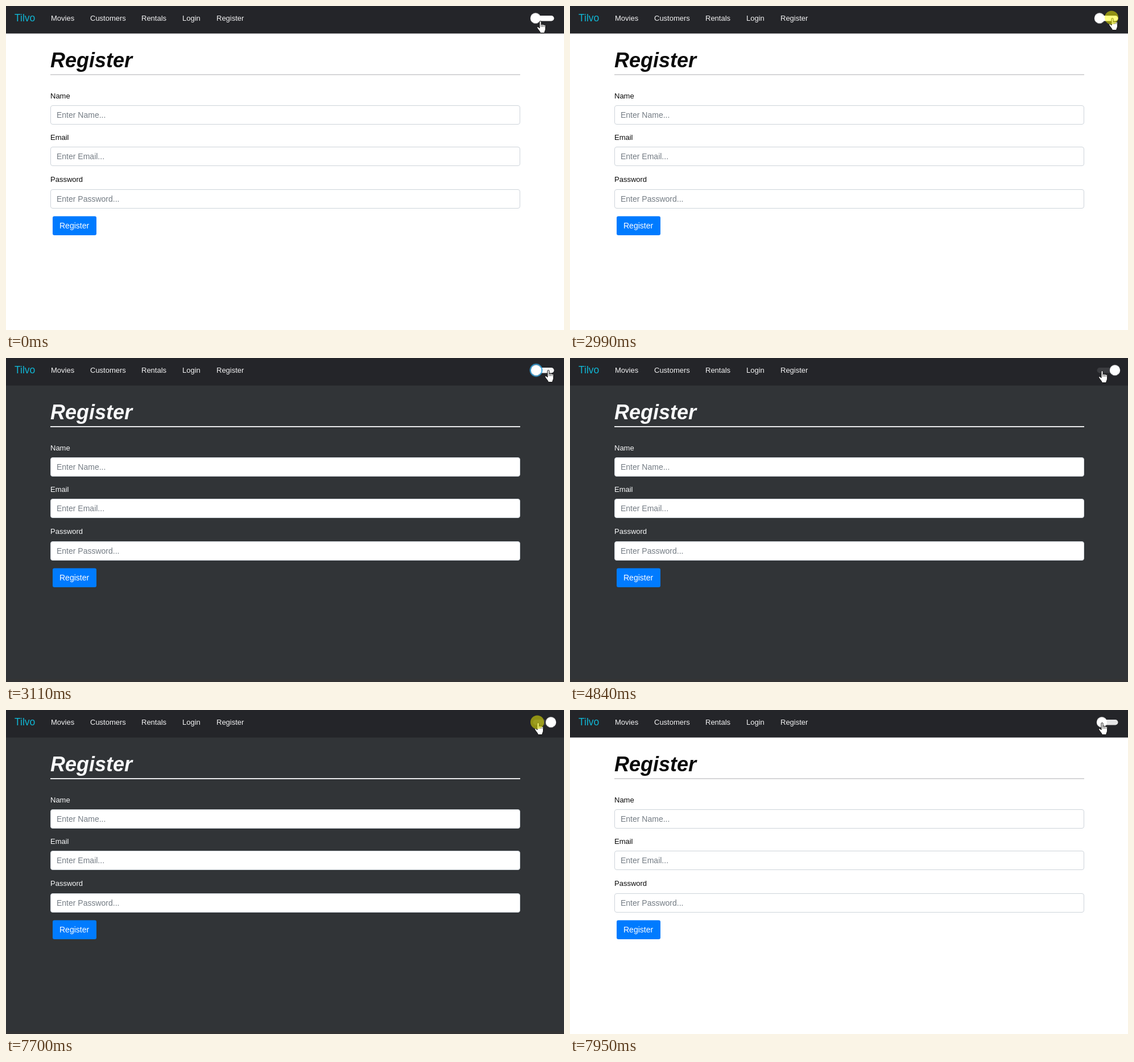
Animation, 981 px wide and 571 px high, one loop 8000 ms. Source, as an HTML page:

```html
<!DOCTYPE html>
<html lang="en">
<head>
<meta charset="utf-8">
<title>Register form with theme switch</title>
<style>
  html, body { margin: 0; width: 100%; height: 100%; overflow: hidden; background: #fff; }
  svg { display: block; width: 981px; height: 571px; }
  text { font: 13px "Liberation Sans", Arial, sans-serif; }
  .nav text { fill: #f3f3f4; }
  .nav .brand { font-size: 17.5px; fill: #10b6d4; }
  .title { font-size: 36px; font-weight: bold; font-style: italic; }
  .fields rect { fill: #fff; stroke: #ced4da; }
  .fields text { font-size: 14px; fill: #747c84; }
  .button text { font-size: 14px; fill: #fff; }

  .dark, .ink, .track, .thumb, .ring, .cursor, .click {
    animation: 8s step-end infinite;
  }
  .dark { animation-name: dark; }
  .ink { fill: currentColor; animation-name: ink; }
  .track { animation-name: track; }
  .thumb { animation-name: thumb; }
  .ring { animation-name: ring; }
  .cursor { animation-name: cursor; }
  .click { animation-name: click; }

  @keyframes dark {
    0%, 97.875% { opacity: 0; }
    38.875% { opacity: 1; }
  }
  @keyframes ink {
    0%, 97.875% { color: #0a0a0a; }
    38.875% { color: #f8f9fa; }
  }
  @keyframes track {
    0% { fill: #fff; }
    38.875% { fill: #f6f6f6; }
    40.5% { fill: #57585c; }
    42% { fill: #3b3c40; }
    97.875% { fill: #45454c; }
    99.375% { fill: #e6e6e7; }
  }
  @keyframes thumb {
    0% { transform: translate(931px, 21.5px); }
    38.875% { transform: translate(932px, 21.5px); }
    40.5% { transform: translate(954px, 21.5px); }
    42% { transform: translate(958px, 21.5px); }
    97.875% { transform: translate(957px, 21.5px); }
    99.375% { transform: translate(935px, 21.5px); }
  }
  @keyframes ring {
    0%, 42% { opacity: 0; }
    38.875% { opacity: .85; }
    40.5% { opacity: .1; }
  }
  @keyframes cursor {
    0% { transform: translate(933px, 26px); }
    1.5% { transform: translate(931px, 27px); }
    3% { transform: translate(928px, 25px); }
    4.625% { transform: translate(927px, 24px); }
    7.75% { transform: translate(938px, 22px); }
    9.375% { transform: translate(947px, 21px); }
    54.375% { transform: translate(940px, 22px); }
    56% { transform: translate(933px, 22px); }
    58.875% { transform: translate(930px, 22px); }
    60.5% { transform: translate(929px, 22px); }
  }
  @keyframes click {
    0%, 38.875%, 97.875% { opacity: 0; }
    37.375%, 96.25% { opacity: .5; }
  }
</style>
</head>
<body>
<svg viewBox="0 0 981 571">
  <rect x="78" y="120" width="826" height="2" fill="#d6d6d8"/>
  <g class="dark">
    <rect width="981" height="571" fill="#343435"/>
    <rect width="981" height="566" fill="#313437"/>
    <rect x="78" y="120" width="826" height="2" fill="#e9eaeb"/>
  </g>

  <g class="nav">
    <rect width="981" height="48.5" fill="#242529"/>
    <text class="brand" x="15" y="27">Tilvo</text>
    <text x="79" y="26">Movies</text>
    <text x="148" y="26">Customers</text>
    <text x="238" y="26">Rentals</text>
    <text x="310" y="26">Login</text>
    <text x="370" y="26">Register</text>
  </g>

  <g class="ink">
    <text class="title" x="78" y="108">Register</text>
    <text x="78" y="163">Name</text>
    <text x="78" y="236">Email</text>
    <text x="78" y="310">Password</text>
  </g>

  <g class="fields">
    <rect x="78.5" y="175.5" width="825" height="33" rx="3.5"/>
    <rect x="78.5" y="248.5" width="825" height="33" rx="3.5"/>
    <rect x="78.5" y="323.5" width="825" height="33" rx="3.5"/>
    <text x="89" y="197">Enter Name...</text>
    <text x="89" y="270">Enter Email...</text>
    <text x="89" y="345">Enter Password...</text>
  </g>

  <g class="button">
    <rect x="82" y="370.5" width="77" height="33.5" rx="3" fill="#007bff"/>
    <text x="94" y="392">Register</text>
  </g>

  <rect class="track" x="926.5" y="17" width="37" height="9.5" rx="4.75"/>
  <g class="thumb">
    <circle class="ring" r="10.2" fill="none" stroke="#33a5e0" stroke-width="2.4"/>
    <circle r="9.2" fill="#fff"/>
  </g>

  <g class="cursor">
    <path d="M5 13V2a1.5 1.5 0 0 1 3 0V7.2a1.3 1.3 0 0 1 2.6.3 1.3 1.3 0 0 1 2.6.6 1.2 1.2 0 0 1 2.4.9V14c0 3-1.6 4-2 7.5H6.5C6 18.500 2.500 16 .9 12.700c-.8-1.900 1-2.700 2.200-1.500z"
      fill="#fff" stroke="#111" stroke-linejoin="round"/>
    <path d="M8 7v4M10.600 7.800v3.200M13.200 8.500v2.500" stroke="#111" stroke-width=".8"/>
    <circle class="click" cx="5" cy="-.5" r="12" fill="#ff0"/>
  </g>
</svg>
</body>
</html>
```
